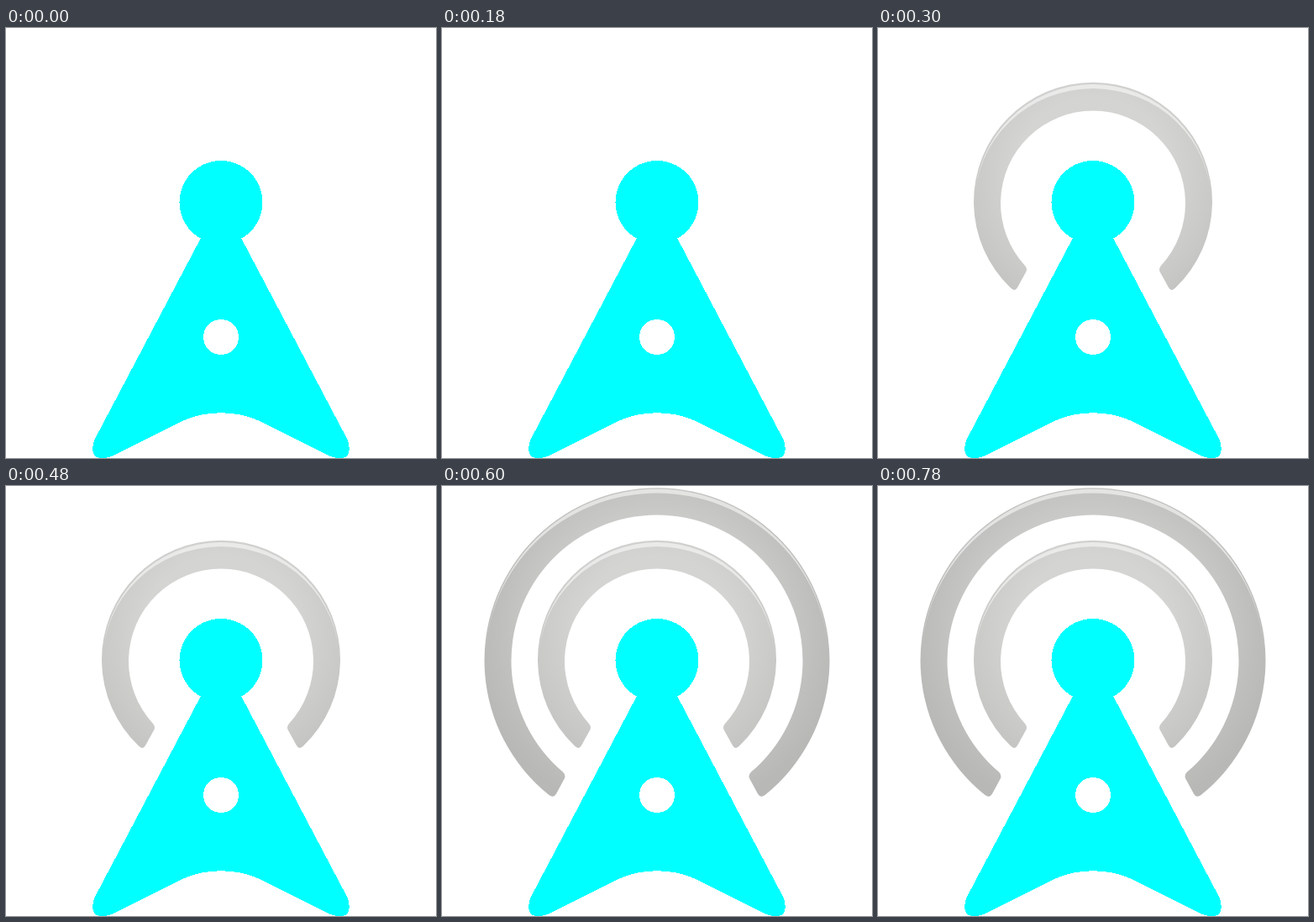
An HTML page that plays this animation: 512x512 px, repeating every 0.9 s.

```html
<!DOCTYPE html>
<html lang="en">
<head>
<meta charset="utf-8">
<title>Broadcast tower</title>
<style>
  html, body { margin: 0; width: 100%; height: 100%; overflow: hidden; background: #fff; }
  svg { display: block; width: 100vw; height: 100vh; }
</style>
</head>
<body>
<svg viewBox="0 0 512 512">
  <defs>
    <radialGradient id="metal" gradientUnits="userSpaceOnUse" cx="256" cy="175" r="220">
      <stop offset=".42" stop-color="#d4d4d2"/>
      <stop offset=".68" stop-color="#c8c8c6"/>
      <stop offset=".87" stop-color="#bebebc"/>
      <stop offset="1" stop-color="#b8b8b6"/>
    </radialGradient>
  </defs>

  <g id="inner">
    <path fill="url(#metal)" d="M158 309.5 A142 142 0 1 1 354 309.5
      Q349 314.500 346 309 L335.500 290 Q334 286 337 283
      A110 110 0 1 0 175 283 Q178 286 176.500 290 L166 309 Q163 314.500 158 309.500 Z"/>
    <path class="shine" data-r="140.5"/>
  </g>

  <g id="outer">
    <path fill="url(#metal)" d="M127.500 368 A205.500 205.500 0 1 1 384.500 368
      Q379 372 376 366.500 L366 348 Q364.500 344 368 340.500
      A173.500 173.500 0 1 0 144 340.500 Q147.500 344 146 348 L136 366.500 Q133 372 127.500 368 Z"/>
    <path class="shine" data-r="204"/>
  </g>

  <g fill="#0ff" shape-rendering="crispEdges">
    <circle cx="256" cy="207.500" r="49.500"/>
    <path d="M232 250 L106 489 C102 497 101 512 112 512 Q120 513 130 508
      L210 468 C238 455 274 455 302 468 L382 508 Q392 513 400 512
      C411 512 410 497 406 489 L280 250 Z"/>
    <circle cx="256" cy="368" r="21" fill="#fff"/>
  </g>
</svg>
<script>
  const LOOP = 900;
  const CX = 256, CY = 207.5;

  // Crescent highlight: a half circle minus a slightly flatter half ellipse.
  for (const shine of document.querySelectorAll('.shine')) {
    const r = +shine.dataset.r;
    shine.setAttribute('d', `M${CX - r} ${CY} A${r} ${r} 0 0 1 ${CX + r} ${CY}
      A${r} ${r - 5} 0 0 0 ${CX - r} ${CY} Z`);
    shine.setAttribute('fill', '#fff');
    shine.setAttribute('fill-opacity', '.55');
  }

  // Each wave appears abruptly and stays until the loop restarts.
  const waves = [['inner', 300], ['outer', 600]];
  for (const [id, start] of waves) {
    const offset = start / LOOP;
    const wave = document.getElementById(id).animate([
      { opacity: 0, offset: 0 },
      { opacity: 0, offset },
      { opacity: 1, offset },
      { opacity: 1, offset: 1 }
    ], { duration: LOOP, iterations: Infinity });
    wave.startTime = 0;
  }
</script>
</body>
</html>
```
